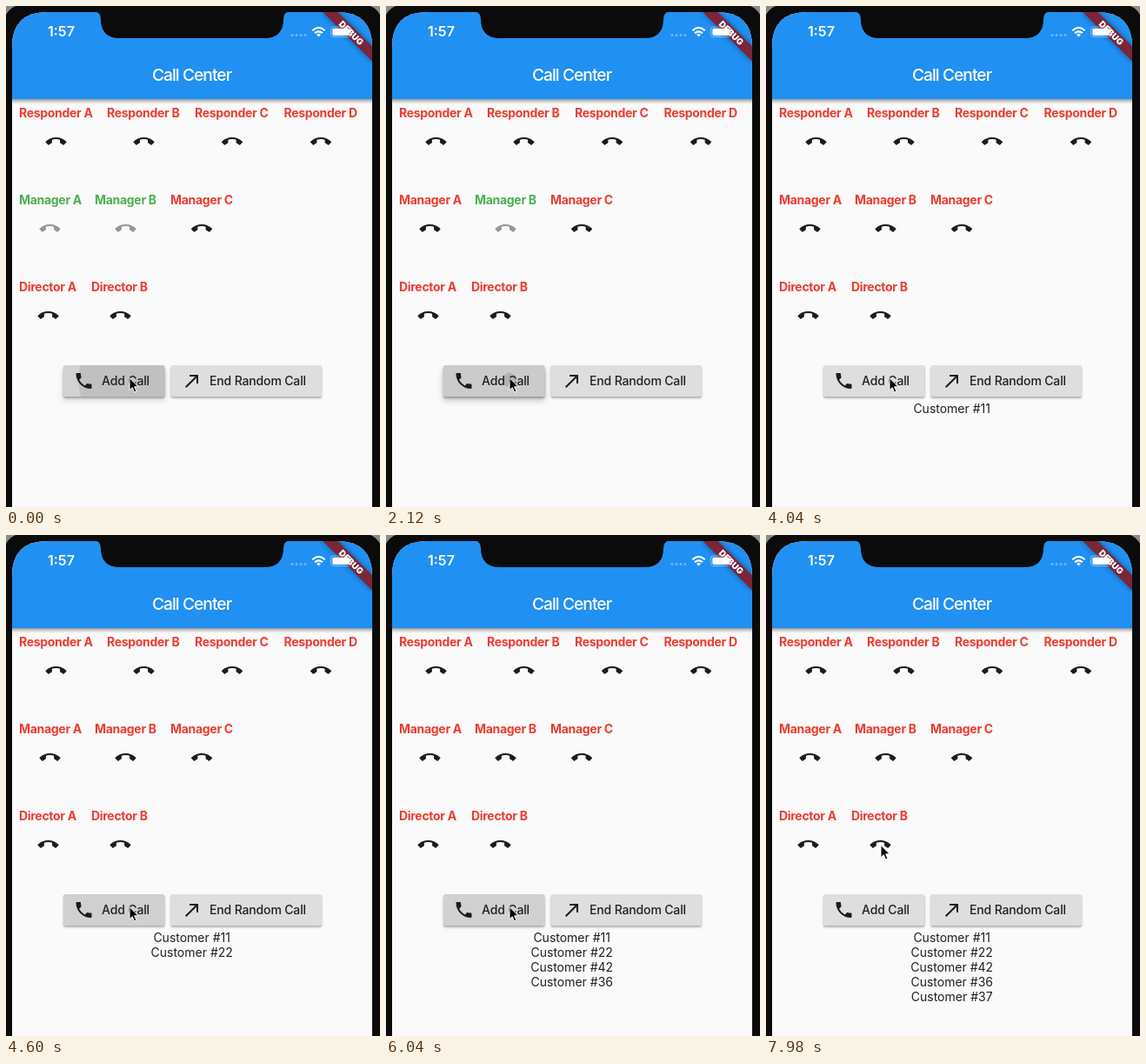
Write an HTML page that moves like this. It is 430 px wide and 576 px high and loops after 8000 ms.

```html
<!DOCTYPE html>
<html lang="en">
<head>
<meta charset="utf-8">
<title>Call Center</title>
<style>
  html, body { margin: 0; width: 100%; height: 100%; overflow: hidden; background: #0b0b0b; }
  svg { display: block; width: 430px; height: 576px; }
  text { font-family: Inter, "Open Sans", sans-serif; font-size: 14px; fill: #202020; }
  .label { font-weight: 700; letter-spacing: -.3px; }
  .button { font-weight: 500; letter-spacing: -.15px; }
  .bar { fill: #fff; }
</style>
</head>
<body>
<svg viewBox="0 0 430 576">
  <defs>
    <clipPath id="screen"><path d="M7 576V47Q7 7 47 7H381Q421 7 421 47V576Z"/></clipPath>
    <clipPath id="addClip"><rect x="66" y="413" width="116.5" height="36" rx="2"/></clipPath>
    <linearGradient id="barShadow" x1="0" y1="0" x2="0" y2="1">
      <stop offset="0" stop-color="#555" stop-opacity=".6"/>
      <stop offset="1" stop-color="#999" stop-opacity="0"/>
    </linearGradient>
    <filter id="soft" x="-20%" y="-50%" width="140%" height="200%"><feGaussianBlur stdDeviation="1.3"/></filter>
    <filter id="softer" x="-20%" y="-50%" width="140%" height="200%"><feGaussianBlur stdDeviation="3"/></filter>
    <path id="hangUp" d="M12 9c-1.6 0-3.15.25-4.6.72v3.1c0 .39-.23.74-.56.9-.98.49-1.87 1.12-2.66 1.85-.18.18-.43.28-.7.28-.28 0-.53-.11-.71-.29L.29 13.08c-.18-.17-.29-.42-.29-.7 0-.28.11-.53.29-.71C3.34 8.78 7.46 7 12 7s8.66 1.78 11.71 4.67c.18.18.29.43.29.71 0 .28-.11.53-.29.71l-2.48 2.48c-.18.18-.43.29-.71.29-.27 0-.52-.11-.7-.28-.79-.74-1.69-1.36-2.67-1.85-.33-.16-.56-.5-.56-.9v-3.1C15.15 9.25 13.6 9 12 9z"/>
  </defs>

  <rect width="430" height="576" fill="#0b0b0b"/>
  <path d="M0 0H11Q4 3 0 10ZM430 0H419Q426 3 430 10Z" fill="#8c8c8c"/>

  <g clip-path="url(#screen)">
    <rect x="7" y="7" width="414" height="569" fill="#fafafa"/>
    <rect x="7" y="107" width="414" height="6" fill="url(#barShadow)"/>
    <rect x="7" y="7" width="414" height="100" fill="#2090f2"/>
    <text class="bar" x="213.5" y="86" text-anchor="middle" style="font-size:19.2px;font-weight:500;letter-spacing:-.95px">Call Center</text>

    <g id="staff"></g>

    <rect x="66" y="415" width="116.5" height="36" rx="2" fill="#666" opacity=".5" filter="url(#soft)"/>
    <rect id="lift" x="65" y="418" width="118.5" height="36" rx="3" fill="#666" filter="url(#softer)"/>
    <rect x="189.5" y="415" width="173.5" height="36" rx="2" fill="#666" opacity=".5" filter="url(#soft)"/>
    <g clip-path="url(#addClip)">
      <rect x="66" y="413" width="116.5" height="36" fill="#dedede"/>
      <rect id="glow" x="66" y="413" width="116.5" height="36"/>
      <g id="splashes"></g>
    </g>
    <rect x="189.5" y="413" width="173.5" height="36" rx="2" fill="#dedede"/>
    <path transform="translate(77.5 419)" fill="#1c1c1c" d="M6.62 10.79c1.44 2.83 3.76 5.14 6.59 6.59l2.2-2.2c.27-.27.67-.36 1.02-.24 1.12.37 2.33.57 3.57.57.55 0 1 .45 1 1V20c0 .55-.45 1-1 1-9.39 0-17-7.61-17-17 0-.55.45-1 1-1h3.5c.55 0 1 .45 1 1 0 1.25.2 2.45.57 3.57.11.35.03.74-.25 1.02l-2.2 2.2z"/>
    <text class="button" x="110" y="436">Add Call</text>
    <path transform="translate(202 419)" fill="#1c1c1c" d="M9 5v2h6.59L4 18.59 5.41 20 17 8.41V15h2V5z"/>
    <text class="button" x="234" y="436">End Random Call</text>

    <g id="queue" text-anchor="middle"></g>

    <g transform="translate(421 7) rotate(45)">
      <rect x="-40" y="28" width="80" height="12" opacity=".45" filter="url(#softer)"/>
      <rect x="-60" y="28" width="120" height="12" fill="#7c2438"/>
      <text class="bar" y="37.6" text-anchor="middle" style="font-size:10px;font-weight:900">DEBUG</text>
    </g>

    <text class="bar" x="48" y="35" style="font-size:16px;font-weight:600">1:57</text>
    <g fill="#fff" opacity=".35">
      <circle cx="329" cy="33.5" r="1.5"/><circle cx="334" cy="33.5" r="1.5"/>
      <circle cx="339" cy="33.5" r="1.5"/><circle cx="344" cy="33.5" r="1.5"/>
    </g>
    <g fill="none" stroke="#fff" stroke-width="2.2">
      <path d="M352.3 28.3Q359.5 21.6 366.7 28.3M355 31.3Q359.5 27.3 364 31.3"/>
      <path d="M357 33L359.5 35.6L362 33Q359.5 31 357 33Z" fill="#fff" stroke="none"/>
    </g>
    <rect x="373.5" y="24" width="23.5" height="11.5" rx="3.2" fill="none" stroke="#fff" stroke-opacity=".45"/>
    <rect x="375.3" y="25.7" width="20" height="8.2" rx="1.8" fill="#fff"/>
    <path d="M398.5 28q2 1.7 0 3.6z" fill="#fff" opacity=".5"/>
  </g>

  <path d="M101 6Q109 7 109 15Q109 37 131 37H297Q319 37 319 15Q319 7 327 6Z" fill="#0b0b0b"/>

  <path id="cursor" d="M0 0V14.2L3.3 11.2L5.6 16.6L8 15.6L5.7 10.3H10.2Z" fill="#080808" stroke="#fff" stroke-width="1" stroke-linejoin="round"/>
</svg>

<script>
const LOOP = 8000;
const SLOW = 2.8;          // the screen plays in slow motion
const FADE = 200 * SLOW, HOLD_GROW = 1000 * SLOW, RADIUS = 78;
const NS = "http://www.w3.org/2000/svg";
const RED = "#ec3c30", GREEN = "#4caf50", DARK = "#1c1c1c", DIM = "#979797";

const $ = id => document.getElementById(id);
const clamp = v => Math.max(0, Math.min(1, v));
const mix = (a, b, k) => a + (b - a) * k;

function add(parent, tag, attrs, text) {
  const el = document.createElementNS(NS, tag);
  for (const name in attrs) el.setAttribute(name, attrs[name]);
  if (text) el.textContent = text;
  parent.appendChild(el);
  return el;
}

// Each person: label, left edge, icon centre, row, time the call arrives
const staff = [
  ["Responder A", 15, 57.5, 0], ["Responder B", 116, 158.5, 0],
  ["Responder C", 217, 260, 0], ["Responder D", 319.5, 362, 0],
  ["Manager A", 15, 50.5, 1, 1480], ["Manager B", 102, 137.5, 1, 2200],
  ["Manager C", 189, 225, 1],
  ["Director A", 15, 48.5, 2], ["Director B", 98, 131.5, 2]
].map(([name, x, cx, row, busyAt = 0]) => ({
  busyAt,
  label: add($("staff"), "text", { class: "label", x, y: 128 + row * 100 }, name),
  icon: add($("staff"), "use", { href: "#hangUp", x: cx - 12, y: 144 + row * 100 })
}));

const queue = [[11, 2900], [22, 4310], [42, 5023], [36, 5750], [37, 6450]]
  .map(([id, at], i) => ({
    at,
    el: add($("queue"), "text", { x: 213.7, y: 468 + i * 17 }, "Customer #" + id)
  }));

// Pointer down and up times
const presses = [[-507, -157], [1140, 1480], [1850, 2200], [2540, 2900],
  [4060, 4310], [4680, 5023], [5400, 5750], [6100, 6450]]
  .map(([down, up]) => ({ down, up, el: add($("splashes"), "circle", { cx: 142, cy: 430 }) }));

function drawSplash({ down, up, el }, t) {
  const held = clamp((Math.min(t, up) - down) / HOLD_GROW);
  const grow = mix(held, 1, clamp((t - up) / (RADIUS * SLOW)));
  const fade = t < down ? 0 : 1 - clamp((t - up) / FADE);
  el.setAttribute("r", RADIUS * grow);
  el.setAttribute("opacity", .12 * fade);
}

// Highlight rises while a press is held and falls between presses
function highlight(t) {
  let level = 0, last = -FADE;
  for (const { down, up } of presses) {
    if (t < down) break;
    level = clamp(level - (down - last) / FADE);
    level = clamp(level + (Math.min(t, up) - down) / FADE);
    last = Math.min(t, up);
  }
  return clamp(level - (t - last) / FADE);
}

function draw(t) {
  for (const { label, icon, busyAt } of staff) {
    const busy = t >= busyAt;
    label.style.fill = busy ? RED : GREEN;
    icon.setAttribute("fill", busy ? DARK : DIM);
  }
  for (const { el, at } of queue) el.setAttribute("visibility", t >= at ? "visible" : "hidden");

  for (const press of presses) drawSplash(press, t);
  const level = highlight(t);
  $("glow").setAttribute("opacity", .16 * level);
  $("lift").setAttribute("opacity", .6 * level);

  const k = clamp((t - 6600) / 1000), ease = k * k * (3 - 2 * k);
  $("cursor").setAttribute("transform", `translate(${mix(142, 132, ease)} ${mix(427.5, 356.5, ease)})`);
}

// Three even steps per 140 ms, shown for 20, 100 and 20 ms
function stepped(t) {
  const cycle = Math.floor(t / 140), rest = t % 140;
  const step = rest < 20 ? 0 : rest < 120 ? 1 : 2;
  return (cycle * 3 + step) * 140 / 3;
}

function tick(now) {
  draw(stepped(now % LOOP));
  requestAnimationFrame(tick);
}
draw(0);
requestAnimationFrame(tick);
</script>
</body>
</html>
```
